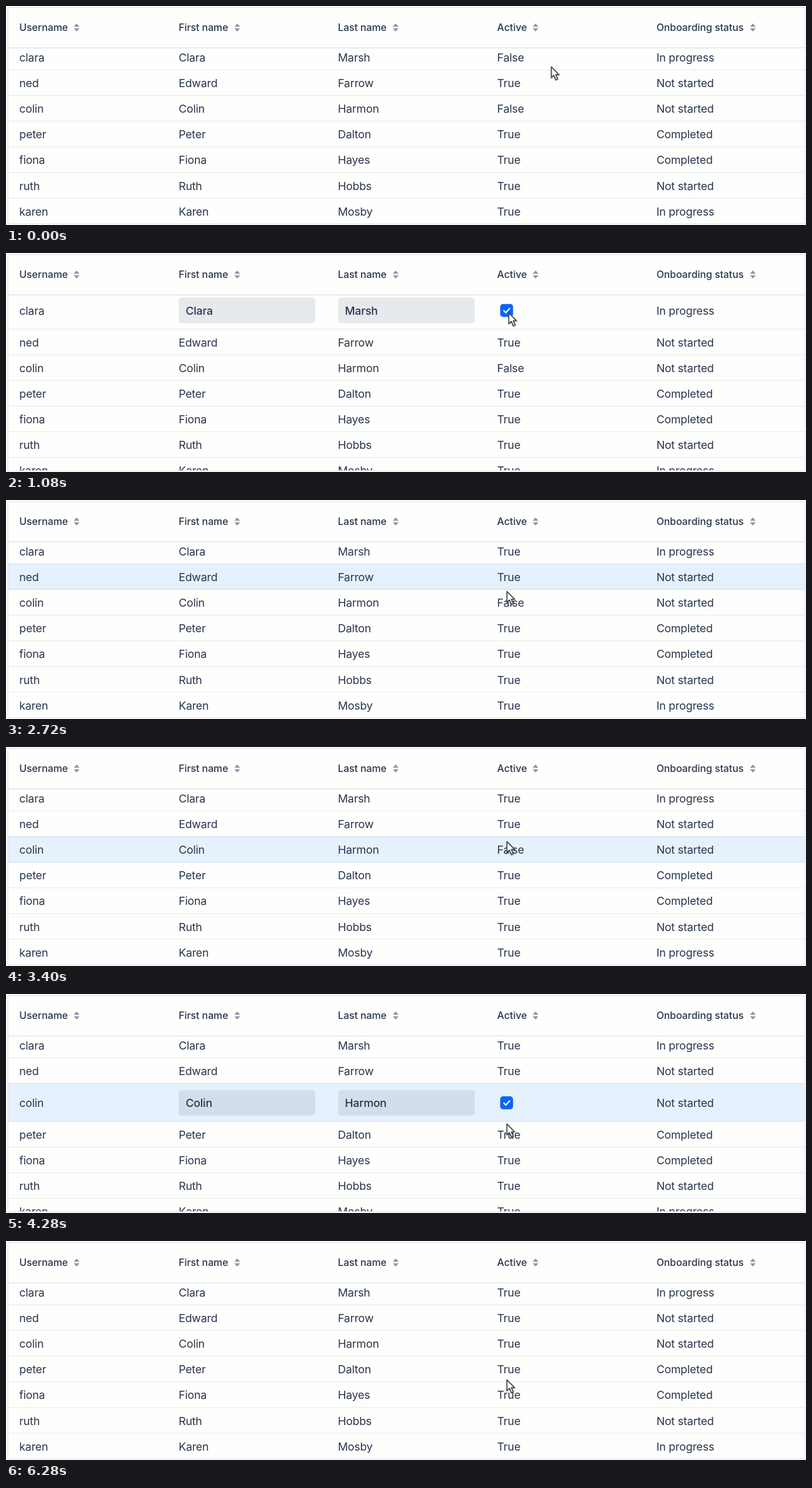
Recreate the animation shown at these times as an HTML page. Size 1280 by 351 pixels, loop 6.44 s.

```html
<!DOCTYPE html>
<html lang="en">
<head>
<meta charset="utf-8">
<title>Editable user table</title>
<style>
html, body { margin: 0; height: 100%; overflow: hidden; background: #fefefd; }
svg { display: block; font: 17.8px Inter, "Open Sans", sans-serif; letter-spacing: -.2px; fill: #28354b; }
.head { font-size: 15.9px; font-weight: 500; letter-spacing: -.04px; }
.value { font-weight: 500; }
</style>
</head>
<body>
<svg id="stage" width="1280" height="351" viewBox="0 0 1280 351"></svg>
<script>
const LOOP = 6440, STEP = 40;
const ROW = 41.15, EDIT_ROW = 60.75, TOP = 61.2;
const headers = ['Username', 'First name', 'Last name', 'Active', 'Onboarding status'];
const sorterX = [113, 370, 623.5, 847.3, 1195];
const people = [
  ['clara', 'Clara', 'Marsh', 'In progress'],
  ['ned', 'Edward', 'Farrow', 'Not started'],
  ['colin', 'Colin', 'Harmon', 'Not started'],
  ['peter', 'Peter', 'Dalton', 'Completed'],
  ['fiona', 'Fiona', 'Hayes', 'Completed'],
  ['ruth', 'Ruth', 'Hobbs', 'Not started'],
  ['karen', 'Karen', 'Mosby', 'In progress']
];
// Pointer keys: time, x, y
const path = [
  [0, 872.5, 97.5], [320, 872.5, 93], [720, 872.5, 93], [1040, 804.5, 96],
  [2520, 804.5, 96], [2680, 801.5, 146.5], [3240, 801.5, 146.5], [3840, 801.5, 175.5],
  [4000, 801.5, 175.5], [4440, 801.5, 222.5], [LOOP, 801.5, 222.5]
];
const stage = document.getElementById('stage');

const colX = i => 21.3 + 254.85 * i;
const within = (t, from, to) => t >= from && t < to;
const rect = (x, y, w, h, fill, r = 0) =>
  `<rect x="${x}" y="${y}" width="${w}" height="${h}" rx="${r}" fill="${fill}"/>`;
const text = (x, mid, s, cls = '') =>
  `<text x="${x}" y="${mid + (cls === 'head' ? 5.7 : 6.4)}" class="${cls}">${s}</text>`;

function pointer(t) {
  const i = path.findIndex(k => k[0] > t);
  const [t0, x0, y0] = path[i - 1], [t1, x1, y1] = path[i];
  const u = (t - t0) / (t1 - t0), e = u * u * (3 - 2 * u);
  const x = x0 + (x1 - x0) * e, y = y0 + (y1 - y0) * e;
  const arrow = 'M0 0V17.3L4 13.7L7.2 20.8L10.2 19.5L7.1 12.6H12.3Z';
  return `<g transform="translate(${x} ${y})" stroke-linejoin="round">
    <path d="${arrow}" transform="translate(.4 1)" fill="none" stroke="#0002" stroke-width="3"/>
    <path d="${arrow}" fill="#fdfdfd" stroke="#45474b" stroke-width="1.7"/></g>`;
}

function sorter(x) {
  return `<path d="M${x - 4.6} 33.2h9.2l-4.6-5.2zM${x - 4.6} 35.8h9.2l-4.6 5.2z" fill="#8d96a6"/>`;
}

function checkbox(mid, checked, hovered) {
  const fill = checked ? '#0b65fb' : hovered ? '#bac6da' : '#d3d8df';
  const tick = `<path d="M796 ${mid - .3}l3.7 3.8l6.6-7.3" fill="none" stroke="#fff" stroke-width="2.2"/>`;
  return rect(790.7, mid - 10.4, 20.6, 20.6, fill, 4.5) + (checked ? tick : '');
}

function row(person, y, h, { editing, hovered, active, checked }) {
  const mid = y + h / 2 + .6;
  const [user, first, last, status] = person;
  let out = hovered ? rect(3, y - .6, 1275, h + 1.1, '#e5f1fc') : '';
  out += text(colX(0), mid, user) + text(colX(4), mid, status);
  [first, last].forEach((name, i) => {
    const x = colX(i + 1);
    if (editing) {
      out += rect(x + .3, mid - 20.6, 218.5, 41, hovered ? '#d2deec' : '#e6eaed', 4.5);
      out += text(x + 11.3, mid, name, 'value');
    } else out += text(x, mid, name);
  });
  return out + (editing ? checkbox(mid, checked, hovered) : text(colX(3), mid, active ? 'True' : 'False'));
}

function scene(t) {
  const editing = within(t, 320, 2720) ? 0 : within(t, 3440, 4640) ? 2 : -1;
  const hovered = within(t, 2640, 3280) ? 1 : within(t, 3280, 4640) ? 2 : within(t, 4640, 6280) ? 3 : -1;
  const checked = editing === 0 ? t >= 1080 : t >= 4000;
  let y = TOP, rows = '', lines = '';
  people.forEach((p, i) => {
    const h = i === editing ? EDIT_ROW : ROW;
    const active = i === 0 ? t >= 2720 : i === 2 ? t >= 4640 : true;
    rows += row(p, y, h, { editing: i === editing, hovered: i === hovered, active, checked });
    y += h;
    lines += rect(3, y - .6, 1275, 1.1, '#1e3c6e1a');
  });
  return `<clipPath id="body"><rect x="3" y="68" width="1275" height="280.5"/></clipPath>
    <g clip-path="url(#body)">${rows}${lines}</g>
    ${headers.map((s, i) => text(colX(i), 34.5, s, 'head') + sorter(sorterX[i])).join('')}
    ${rect(3, 66.5, 1275, 1.2, '#dce0ea')}
    <rect x="3" y="2.6" width="1275.5" height="346.6" fill="none" stroke="#e0e3ea" stroke-width="1.2"/>
    ${pointer(t)}`;
}

let shown = -1;
function tick() {
  const t = Math.floor(performance.now() % LOOP / STEP) * STEP;
  if (t !== shown) stage.innerHTML = scene(shown = t);
  requestAnimationFrame(tick);
}
tick();
</script>
</body>
</html>
```
